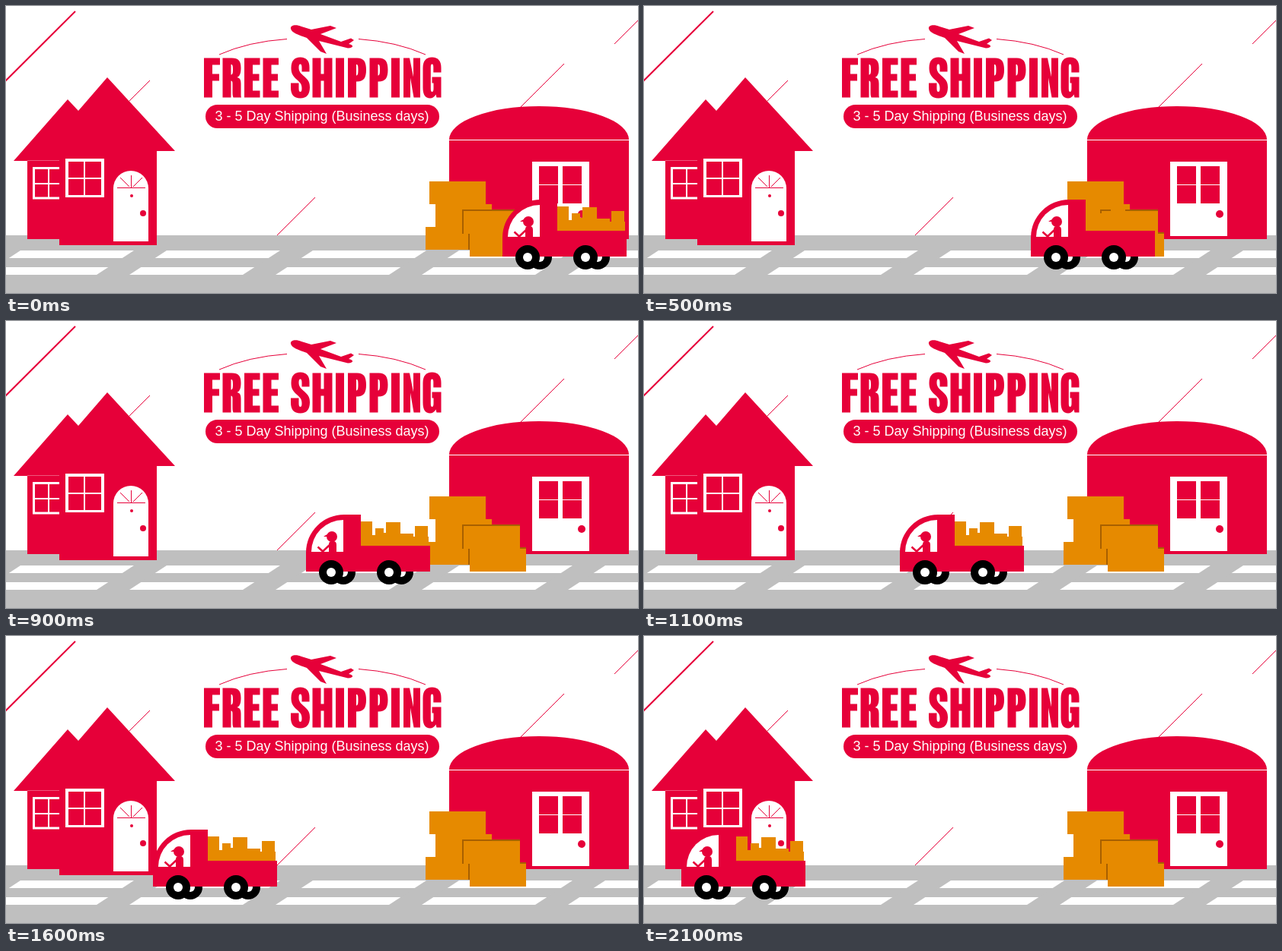
An HTML page that plays this animation: 830x378 px, repeating every 2.6 s.

```html
<!DOCTYPE html>
<html lang="en">
<head>
<meta charset="utf-8">
<title>Free Shipping</title>
<style>
  html, body { margin: 0; width: 100%; height: 100%; overflow: hidden; background: #fff; }
  svg { display: block; position: absolute; left: 0; top: 0; }
  .red { fill: #e60039; }
  .white { fill: #fff; }
  .box { fill: #e68a00; }
  .edge { fill: #a86000; }
  .grey { fill: #bfbfbf; }
  .line { fill: none; stroke: #e60039; }
  .label { font: 18px "Liberation Sans", Arial, sans-serif; fill: #fff; text-anchor: middle; }
</style>
</head>
<body>
<svg width="830" height="378" viewBox="0 0 830 378">
  <defs>
    <g id="wheel">
      <circle r="16"/>
      <circle r="6" class="white"/>
    </g>
  </defs>

  <g class="line">
    <path d="M-1 99L91 7" stroke-width="2"/>
    <path d="M189 98L150 137M733 76L675 134M831 18L799 50M406 252L355 303"/>
  </g>

  <g id="road">
    <path class="grey" d="M0 302H830V378H0Z"/>
    <path class="white" d="M0 322H830V332H0ZM0 344H830V354H0Z"/>
  </g>

  <g id="house">
    <path class="red" d="M10 204L81 123L95 138L133 94L222 191H198V315H70V307H28V204Z"/>
    <path d="M28 203.5H70" stroke="#f27a98" stroke-width=".7"/>
    <path class="white" d="M35 212H70V254.500H35Z"/>
    <path class="red" d="M38 215H55V233H38ZM57 215H70V233H57ZM38 235H55V251.500H38ZM57 235H70V251.500H57Z"/>
    <path class="white" d="M78 201H129V252H78Z"/>
    <path class="red" d="M82 205H102V226H82ZM104 205H125V226H104ZM82 228H102V249H82ZM104 228H125V249H104Z"/>
    <path class="white" d="M141 310V240A23 23 0 0 1 187 240V310Z"/>
    <path class="line" d="M146 239.500H183M164.500 223V239M150 226L162 238M179 226L167 238"/>
    <circle class="red" cx="165" cy="250" r="2"/>
    <circle class="red" cx="180" cy="273" r="4"/>
  </g>

  <g id="warehouse">
    <path class="red" d="M582 176A118 44 0 0 1 818 176ZM582 177H818V307H582Z"/>
    <path class="white" d="M691 205H766V303H691Z"/>
    <path class="red" d="M700 211H725V235H700ZM731 211H756V235H731ZM700 236H725V260H700ZM731 236H756V260H731Z"/>
    <circle class="red" cx="756" cy="274" r="5"/>
  </g>

  <g id="stack">
    <path class="box" d="M556 231H630V261H638V291H626V321H551V291H564V261H556Z"/>
    <path class="edge" d="M599 268H675V300H599ZM607 298H683V321H607Z"/>
    <path class="box" d="M601 270H675V300H683V330H609V300H601Z"/>
  </g>

  <g id="sign">
    <path class="line" d="M280 64Q318 47 369 43.500M551 64Q513 47 463 43.500"/>
    <path class="red" d="M374 30C373 25 381 24 388 27L401 31L426 26L434 29L413 37L440 47L453 42.500L457 45L450 50C456 51 458 55 449 55.500L411 46L421 63L413 60L395 42C384 38 375 35 374 30Z"/>
    <g id="title" class="red" role="img" aria-label="FREE SHIPPING" fill-rule="evenodd"></g>
    <rect class="red" x="262" y="130" width="307" height="31" rx="15.500"/>
    <text class="label" x="415" y="151">3 - 5 Day Shipping (Business days)</text>
  </g>

  <g id="truck">
    <use href="#wheel" x="49" y="331"/>
    <use href="#wheel" x="125" y="331"/>
    <path class="box" d="M72 264H87V282H91V273H102V279H105V265H124V280H141V284H143V270H160V284H161V297H72Z"/>
    <path class="red" d="M0 330V305A50 50 0 0 1 50 255H72V296H163V330Z"/>
    <path class="white" d="M7 304A42 42 0 0 1 49 262V304Z"/>
    <g id="driver">
      <circle class="red" cx="34" cy="284" r="7"/>
      <path class="red" d="M23 284Q26 281 33 280V284ZM30 304V294Q30 290 34 290H36Q40 290 40 295V304Z"/>
      <path class="line" d="M15.500 297.500L22 303.500L31 295" stroke-width="2.500"/>
    </g>
    <use href="#wheel" x="33" y="331"/>
    <use href="#wheel" x="109" y="331"/>
  </g>
</svg>
<script>
  const LOOP = 2600, STEP = 100, LAST = 21;
  const START_X = 652, END_X = 49;
  const $ = id => document.getElementById(id);

  function addPath(parent, d, attrs = {}) {
    const path = document.createElementNS("http://www.w3.org/2000/svg", "path");
    for (const [key, value] of Object.entries({ d, ...attrs })) path.setAttribute(key, value);
    parent.append(path);
  }

  // Slanted crossings, one every 192 px
  for (let x = -24; x < 900; x += 192) {
    addPath($("road"), `M${x} 322h43l-49 32h-43Z`, { class: "grey" });
  }

  // Condensed headline letters, 52 px tall
  const glyphs = {
    F: "M0 0H21V9H11V21H20V30H11V52H0Z",
    E: "M0 0H20.5V9H11V21H19.5V30H11V43H20.5V52H0Z",
    H: "M0 0H11V21H15V0H26V52H15V30H11V52H0Z",
    I: "M0 0H11V52H0Z",
    N: "M0 0H8L13 25V0H22V52H13.5L9 26V52H0Z",
    P: "M0 0H12C21 0 24 5 24 15.5S21 31 12 31H11V52H0ZM11 8.5V23C13 23 13.5 21 13.5 15.5S13 8.5 11 8.5Z",
    R: "M0 0H12C21 0 24 4 24 13C24 20 22.5 24 19 25.5C23 26.5 24 29 24 34V45C24 49 24 51 24.5 52H14C13 50 13 47 13 44V34C13 31 12.5 30 11 30V52H0Z" +
       "M11 8.5V22C13 22 13.5 20 13.5 15S13 8.5 11 8.5Z",
    S: "M24.5 18H14.5V13Q14.5 8 12.5 8Q10.5 8 10.5 12.5C10.5 18 13 20 18 24.5C23 29 25 32 25 38.5C25 48 21 53 12.5 53C4 53 0 48 0 39V33H10.5V40" +
       "Q10.5 44.5 12.5 44.5Q14.5 44.5 14.5 40C14.5 35 13 33 8 28.5C2.5 23.5 .5 20 .5 13C.5 4 4.5 -1 12.5 -1C20.5 -1 24.5 4 24.5 12Z",
    G: "M24 19H13.8V12Q13.8 8 12 8Q10.3 8 10.3 12V40Q10.3 44.5 12 44.5Q14 44.5 14 40V33H12V25H24V52H18L17 48" +
       "C15 51.5 12.5 53 9.5 53C3 53 0 48 0 39V13C0 4 4 -1 12 -1C20 -1 24 4 24 13Z"
  };
  const letterX = [260, 284.5, 313, 337.5, 374, 402.5, 433, 449, 477.5, 506, 522, 547.5];
  [..."FREESHIPPING"].forEach((letter, i) =>
    addPath($("title"), glyphs[letter], { transform: `translate(${letterX[i]} 68.5)` }));

  // The truck jumps left every step, then waits at the house
  function draw(now) {
    const step = Math.min(LAST, Math.floor(now % LOOP / STEP));
    const x = Math.round(START_X + (END_X - START_X) * step / LAST);
    $("truck").setAttribute("transform", `translate(${x} 0)`);
  }

  function tick() {
    draw(performance.now());
    requestAnimationFrame(tick);
  }
  tick();
</script>
</body>
</html>
```
